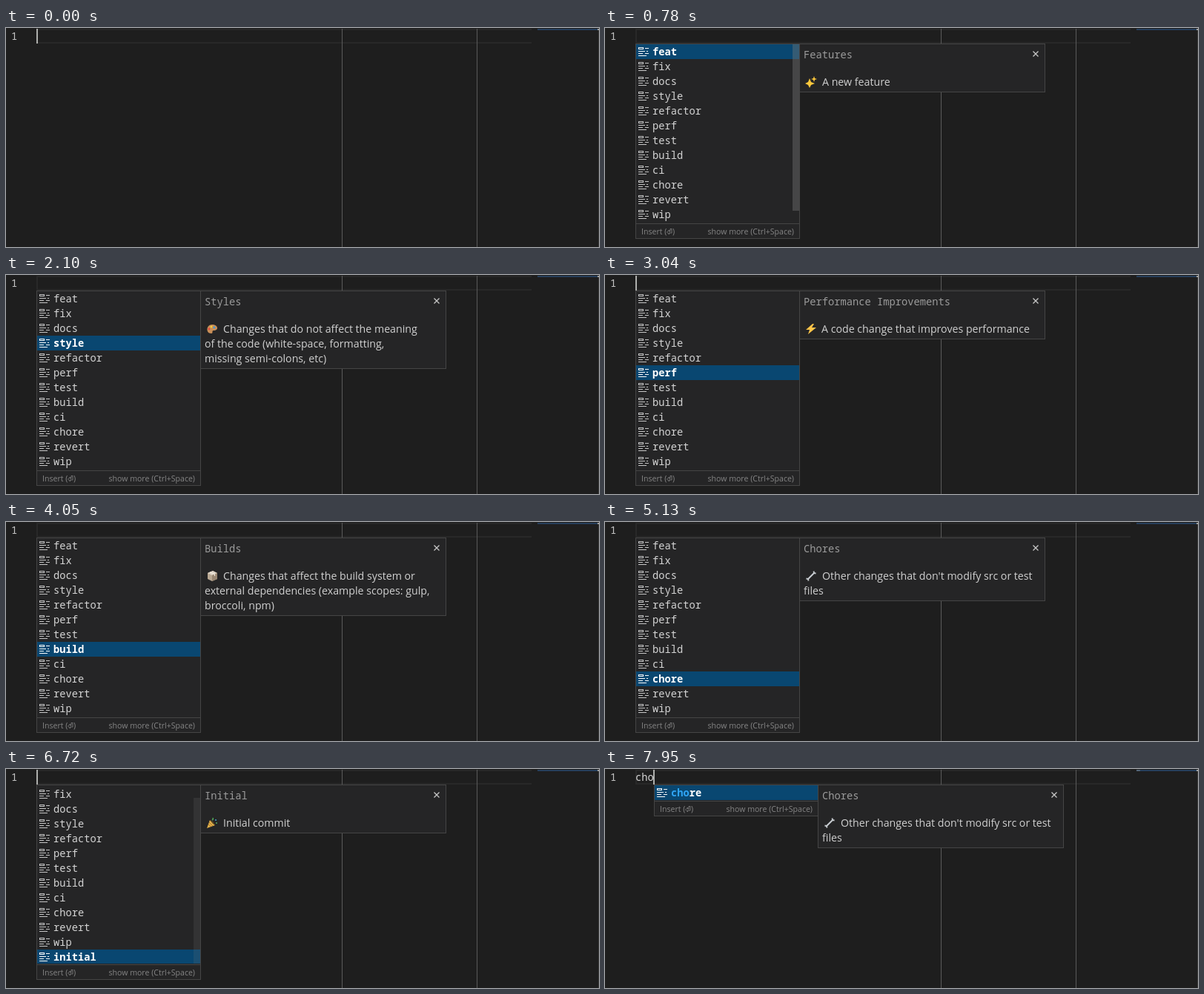
Recreate the animation shown at these times as an HTML page. Size 800 px wide and 296 px high, loop 8 s.

```html
<!DOCTYPE html>
<html lang="en">
<head>
<meta charset="utf-8">
<title>Commit type suggestions</title>
<style>
html, body { margin: 0; width: 100%; height: 100%; overflow: hidden; background: #1e1e1e; }
svg { display: block; }
text { white-space: pre; }
.mono { font: 13.75px "Noto Sans Mono", "DejaVu Sans Mono", monospace; fill: #d4d4d4; }
.bold { font-weight: 700; fill: #fff; }
.match { fill: #2fa4f5; }
.title { fill: #9b9b9b; }
.desc { font: 14.2px "Open Sans", "Noto Sans", sans-serif; fill: #d0d0d0; }
.foot { font: 10.58px "Open Sans", "Noto Sans", sans-serif; fill: #858585; }
</style>
</head>
<body>
<svg id="stage" width="800" height="296" viewBox="0 0 800 296"></svg>
<script>
const LOOP = 8000, CHAR = 8.25, ROW = 20;
const stage = document.getElementById('stage');

const rect = (x, y, w, h, fill, more = '') =>
  `<rect x="${x}" y="${y}" width="${w}" height="${h}" fill="${fill}" ${more}/>`;
const path = (d, fill, more = '') => `<path d="${d}" fill="${fill}" ${more}/>`;
const line = (d, color, w = 1) => path(d, 'none', `stroke="${color}" stroke-width="${w}"`);
const dot = (x, y, r, fill) => `<circle cx="${x}" cy="${y}" r="${r}" fill="${fill}"/>`;
const text = (x, y, cls, s, more = '') => `<text x="${x}" y="${y}" class="${cls}" ${more}>${s}</text>`;
const box = (x, y, w, h) =>
  rect(x + .5, y + .5, w - 1, h - 1, '#252526', 'stroke="#454545"');

// Small pictograms on a 16 x 16 grid
const icons = {
  sparkles: path('M6 3L8 8L13 10L8 12L6 16L4 12L0 10L4 8Z', '#fcc83c') +
    path('M12 0L13 3L16 4L13 5L12 8L11 5L8 4L11 3Z', '#fcc83c'),
  bug: line('M1 12Q4 7 8 9T14 3', '#8bb83f', 4) + dot(13, 4, 2.5, '#a6cf52'),
  memo: path('M1 2H12L14 4V15H1Z', '#e9e9e9') + line('M3 6H9M3 9H8M3 12H11', '#8d949b') +
    line('M7 10L14 2', '#e9a83a', 2.4) + path('M6 12L6.4 9.2L8.4 11Z', '#444'),
  palette: path('M8 2C0 2 -1 14 7 14C10 14 7 10 10 10C18 10 16 2 8 2Z', '#c98f58') +
    dot(4, 8, 1.4, '#e8483f') + dot(7, 5, 1.4, '#f6cf3c') + dot(11, 6, 1.4, '#3d9be0'),
  recycle: line('M4 7L8 2L12 7M13 9L11 14H7M5 14H3L2 10', '#4fae4c', 2.4),
  bolt: path('M10 1L1 9H6L4 15L15 6H9L12 1Z', '#fcc449'),
  check: rect(1, 1, 14, 14, '#3fa04a') + line('M4 8L7 11L12 4', '#fff', 2),
  parcel: path('M2 4L9 1L15 4V12L8 15L2 12Z', '#b9a893') + path('M2 4L9 1L15 4L8 7Z', '#ddd3c6') +
    path('M8 7L15 4V12L8 15Z', '#988672') + line('M5 2.7L11.5 5.5V8', '#efe8dd', 1.2),
  worker: dot(8, 8, 4, '#f2c14e') + path('M3 6Q8 -2 13 6Z', '#f7a928') + path('M2 15Q8 9 14 15Z', '#e5733a'),
  wrench: line('M4 12L12 4', '#c9ced2', 2) + line('M1.5 11.5L4 12L4.5 14.5M11.5 1.5L12 4L14.5 4.5', '#c9ced2', 1.8),
  rewind: rect(1, 1, 14, 14, '#3b87c8') + path('M8 4V12L3 8ZM13 4V12L8 8Z', '#fff'),
  barrier: rect(1, 4, 14, 5, '#f4b73f') + line('M3 9L6 4M8 9L11 4', '#333', 2) + line('M3 9V15M13 9V15', '#aaa', 1.5),
  party: path('M1 15L5 4L12 11Z', '#e3b04b') + line('M3 10L7 13M4 7L9 12', '#a87b2c') +
    path('M5 4Q10 5 12 11L9 9Z', '#5b4a26') + line('M8 4Q10 3 9 1', '#54a95a', 1.5) +
    dot(13, 4, 1.1, '#3f97c9') + dot(14, 8, 1, '#4fae62')
};

const types = [
  ['feat', 'Features', 'sparkles', 'A new feature'],
  ['fix', 'Bug Fixes', 'bug', 'A bug fix'],
  ['docs', 'Documentation', 'memo', 'Documentation only changes'],
  ['style', 'Styles', 'palette', 'Changes that do not affect the meaning', 'of the code (white-space, formatting,', 'missing semi-colons, etc)'],
  ['refactor', 'Code Refactoring', 'recycle', 'A code change that neither fixes a bug', 'nor adds a feature'],
  ['perf', 'Performance Improvements', 'bolt', 'A code change that improves performance'],
  ['test', 'Tests', 'check', 'Adding missing tests or correcting', 'existing tests'],
  ['build', 'Builds', 'parcel', 'Changes that affect the build system or', 'external dependencies (example scopes: gulp,', 'broccoli, npm)'],
  ['ci', 'Continuous Integrations', 'worker', 'Changes to our CI configuration files and', 'scripts (example scopes: runner, matrix,', 'nightly, cache)'],
  ['chore', 'Chores', 'wrench', "Other changes that don't modify src or test", 'files'],
  ['revert', 'Reverts', 'rewind', 'Reverts a previous commit'],
  ['wip', 'Work in Progress', 'barrier', 'Work in progress, not ready to use'],
  ['initial', 'Initial', 'party', 'Initial commit']
].map(([name, title, icon, ...desc]) => ({ name, title, icon, desc }));

const rowIcon = 'M15 4h-5V3h5zM14 7h-2v1h2zM10 7H1v1h9zM12 13H1v1h11zM7 10H1v1h6zM15 10h-5v1h5z' +
  'M8 2v3H1V2zM7 3H2v1h5z';

const selectTimes = [700, 1000, 1480, 1950, 2500, 3040, 3570, 4050, 4600, 5060, 5610, 6080, 6720];
const blinkTimes = [470, 1000, 1100, 1630, 2100, 2580, 3120, 3570, 4050, 4600, 5130, 5610, 6150, 6550, 7100, 7480];
const keyTimes = [7480, 7710, 7950];
const passed = (times, t) => times.filter(at => t >= at).length;

function sliderAlpha(t) {
  if (t < 1480) return .4;
  if (t < 1950) return .05;
  if (t < 6720) return 0;
  return t < 6790 ? .17 : .4;
}

function stateAt(t) {
  const typed = 'cho'.slice(0, passed(keyTimes, t));
  const filter = t >= 7560 ? typed : '';
  const items = types.filter(o => o.name.startsWith(filter));
  const selected = filter ? 0 : passed(selectTimes, t) - 1;
  return {
    typed, filter, items, selected,
    cursor: passed(blinkTimes, t) % 2 === 0,
    details: t >= 780,
    slider: filter ? 0 : sliderAlpha(t)
  };
}

function editor({ typed, cursor }) {
  let s = rect(0, 0, 800, 296, '#1e1e1e') +
    rect(41, 1, 668, 2, '#282828') + rect(41, 19, 668, 2, '#282828') + rect(41, 1, 2, 20, '#282828') +
    rect(453, 1, 1, 295, '#5a5a5a') + rect(635, 1, 1, 295, '#5a5a5a') +
    rect(717, 1, 82, 2, '#263f5c') + rect(799, 1, 1, 295, '#383838') + rect(798, 1, 2, 2, '#a0a0a0') +
    text(7, 16, 'mono', '1', 'style="fill:#c6c6c6"');
  if (typed) s += text(41, 16, 'mono', typed) + rect(717, 1, typed.length * 1.6, 2, '#536578');
  if (cursor) s += rect(41 + Math.floor(typed.length * CHAR), 1, 2, 20, '#aeafad');
  return s;
}

function menu({ filter, items, selected, slider }) {
  const height = Math.min(items.length * ROW + 1, 242);
  const scroll = selected === 12 ? 18 : 0;
  const bottom = 22 + height;
  let rows = '';
  items.forEach(({ name }, i) => {
    const y = 22 + i * ROW - scroll, on = i === selected;
    if (on) rows += rect(42, y, 221, ROW, '#094771');
    rows += path(rowIcon, on ? '#fff' : '#c5c5c5', `fill-rule="evenodd" transform="translate(44 ${y + 2})"`);
    rows += text(64, y + 15, on ? 'mono bold' : 'mono',
      `<tspan class="match">${filter}</tspan>${name.slice(filter.length)}`);
  });
  const edge = bottom - 264;
  return box(41, 21, 222, height + 22) +
    `<clipPath id="list"><rect x="42" y="22" width="220" height="${height - 1}"/></clipPath>` +
    `<g clip-path="url(#list)">${rows}` +
    (slider ? rect(253, scroll ? 39 : 22, 9, 225, '#797979', `opacity="${slider}"`) : '') + '</g>' +
    rect(42, bottom, 220, 1, '#454545') +
    `<g transform="translate(0 ${edge})">` +
    text(49, 279, 'foot', 'Insert (') +
    path('M90 271.5V277H86.5V279L83.5 276L86.5 273V275H88V271.5Z', 'none', 'stroke="#858585" stroke-width=".8"') +
    text(91, 279, 'foot', ')') +
    text(255, 279, 'foot', 'show more (Ctrl+Space)', 'text-anchor="end"') + '</g>';
}

function details({ title, icon, desc }) {
  return box(262, 21, 332, 46 + ROW * desc.length) +
    text(268, 41, 'mono title', title) +
    line('M577.5 31.5L584.5 38.5M584.5 31.5L577.5 38.5', '#c8c8c8', 1.3) +
    `<g transform="translate(270 65)">${icons[icon]}</g>` +
    desc.map((s, i) => text(i ? 268 : icon === 'bolt' ? 292 : 293, 78 + i * ROW, 'desc', s)).join('');
}

let shown = '';
function draw(t) {
  const s = stateAt(t);
  let out = editor(s);
  if (s.selected >= 0) {
    const shift = Math.round(s.filter.length * CHAR);
    out += `<g transform="translate(${shift} 0)">` + menu(s) +
      (s.details ? details(s.items[s.selected]) : '') + '</g>';
  }
  if (out !== shown) stage.innerHTML = shown = out;
}

const start = performance.now();
function tick() {
  draw((performance.now() - start) % LOOP);
  requestAnimationFrame(tick);
}
tick();
</script>
</body>
</html>
```
